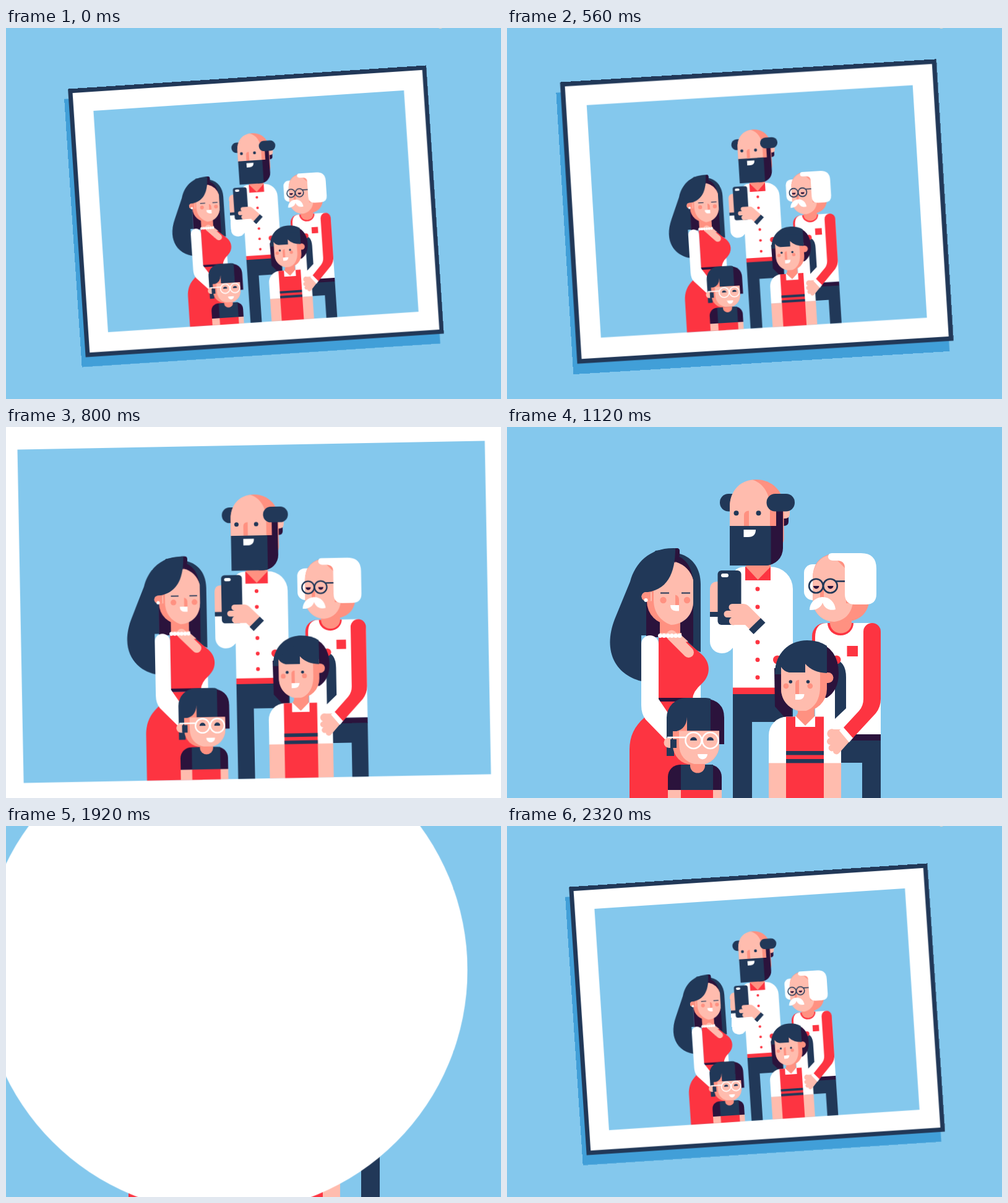
These frames come from a looping animation (800 by 600 pixels, 3600 ms). An HTML page:

```html
<!DOCTYPE html>
<html lang="en">
<head>
<meta charset="utf-8">
<title>Family photo</title>
<style>
  html, body { margin: 0; width: 100%; height: 100%; overflow: hidden; background: #84c8ed; }
  svg { display: block; width: 800px; height: 600px; }
  .sky { fill: #84c8ed; }
  .shade { fill: #419fd8; }
  .navy { fill: #213858; }
  .plum { fill: #2b133c; }
  .red { fill: #fd3441; }
  .skin { fill: #ffbcae; }
  .blush { fill: #ff9181; }
  .white { fill: #fff; }
  .line { fill: none; stroke-width: 2.6; }
  .ink { stroke: #213858; }
  .chalk { stroke: #fff; }

  .card { animation: zoom 3.6s infinite; }
  .flash { transform-origin: 353px 233px; animation: flash 3.6s infinite; }

  @keyframes zoom {
    0%, 10% {
      transform: translate(404px, 296.4px) rotate(-3.77deg) scale(.5875);
      animation-timing-function: cubic-bezier(.7, 0, .315, 1);
    }
    31.111% {
      transform: translate(400px, 300px) rotate(0deg) scale(1);
      animation-timing-function: step-end;
    }
    54.444%, 100% {
      transform: translate(404px, 296.4px) rotate(-3.77deg) scale(.5875);
    }
  }
  @keyframes flash {
    0%, 48.35% {
      transform: scale(0);
      opacity: 1;
      animation-timing-function: cubic-bezier(.6, 0, .8, .4);
    }
    54.444% {
      transform: scale(1);
      opacity: 1;
      animation-timing-function: ease-in-out;
    }
    64.444%, 100% { transform: scale(1); opacity: 0; }
  }
</style>
</head>
<body>
<svg viewBox="0 0 800 600">
  <defs>
    <clipPath id="window"><rect x="-28" y="-5.5" width="856" height="611"/></clipPath>
  </defs>
  <rect class="sky" width="800" height="600"/>
  <ellipse cx="702" cy="-.5" rx="3" ry="1.5" fill="#e3d6c8"/>

  <g class="card">
    <rect class="shade" x="-506" y="-343" width="988" height="740"/>
    <rect class="navy" x="-494" y="-370" width="988" height="740"/>
    <rect class="white" x="-482" y="-358" width="964" height="716"/>
    <g transform="translate(-400 -300)" clip-path="url(#window)">
      <rect class="sky" x="-30" y="-10" width="860" height="620"/>

      <!-- father -->
      <g>
        <path class="navy" d="M365 431H462V477H396V612H365Z"/>
        <path class="skin" d="M328 300V263Q328 250 341 250H345V300Z"/>
        <path class="navy" d="M328 299H345V307.500H328Z"/>
        <path class="white" d="M328 307H365V240Q368 226 385 226H426A36 36 0 0 1 462 262V422H365V357Q358 366 347 366A19 19 0 0 1 328 347Z"/>
        <path class="red" d="M365 421.500H462V432H365ZM385 226H426V248H385Z"/>
        <path class="blush" d="M386 220H426V226L405.500 247L386 226Z"/>
        <g class="red">
          <circle cx="405" cy="262" r="3.500"/>
          <circle cx="405" cy="291" r="3.500"/>
          <circle cx="405" cy="348" r="3.500"/>
          <circle cx="405" cy="376.500" r="3.500"/>
          <circle cx="405" cy="405" r="3.500"/>
        </g>
        <rect class="navy" x="344" y="108" width="40" height="28.500" rx="14"/>
        <path class="plum" d="M444 145H455V153Q455 160 447 160H444Z"/>
        <path class="skin" d="M444 134H457V140Q457 148 449 148H444Z"/>
        <path class="blush" d="M360 165V129C360 104 378 85 403 85C428 85 447.500 104 447.500 129V180Q447.500 188 443 192H400Z"/>
        <path class="skin" d="M360 162V129C360 104 376 87 397 85.500C414 91 425 108 425 130V162Z"/>
        <path class="plum" d="M435 130H446V196A28 28 0 0 1 418 224H410V160H435Z"/>
        <path class="navy" d="M360 160H426.500V222.500Q422 224 417 224H360Z"/>
        <rect class="navy" x="419.500" y="108" width="45.500" height="28.500" rx="14"/>
        <circle class="navy" cx="370.500" cy="139.300" r="4"/>
        <circle class="navy" cx="406.500" cy="139.300" r="4"/>
        <path class="blush" d="M383 160V143Q383 135.500 391 135.500V160Z"/>
        <path class="white" d="M382.500 166H402Q402 178 390 178H382.500Z"/>
        <rect class="navy" x="340.500" y="232" width="38" height="88" rx="6"/>
        <rect class="white" x="346" y="237" width="12" height="6" rx="3"/>
        <path class="skin" d="M364 286H381Q387 286 391 290L411 310L393 328L385 320H368A6 6 0 0 1 363 308H356A5.500 5.500 0 0 1 356 297H364A5.500 5.500 0 0 1 364 286Z"/>
        <path class="navy" d="M410 309L417.500 316.500L398.500 335L391 327.500Z"/>
      </g>

      <!-- mother -->
      <g>
        <path class="navy" d="M268 200H279V205C301 211 313 230 313 254V364L268 345Z"/>
        <path class="plum" d="M225 262L268 208H274C292 214 301 232 301 256V354L285 340H225Z"/>
        <path class="navy" d="M279 205V200Q279 196 274 196H268C230 196 207 220 199 250L176 306C153 360 174 400 217 411V337H225V270L272 214Z"/>
        <path class="blush" d="M247 305H280V340H247Z"/>
        <path class="white" d="M290 395H313V440H290Z"/>
        <path class="skin" d="M247 333H282V345H247Z"/>
        <path class="blush" d="M226 266L258 220H272Q295 225 301 248V282A37.500 38 0 0 1 226 282Z"/>
        <path class="skin" d="M237 262L262 218H272Q295 225 301 248V282C301 304 286 319 265 320C248 314 237 300 237 280Z"/>
        <path class="plum" d="M268 196H274Q279 196 279 201V208L271 220Z"/>
        <path class="navy" d="M272 196C272 236 260 266 219 268L205 240L240 200Z"/>
        <path class="skin" d="M234 267H224A7.300 7.300 0 0 0 224 281.500H234Z"/>
        <path class="blush" d="M232 267H224A7.300 7.300 0 0 0 224 281.500H232Z"/>
        <circle class="white" cx="224.500" cy="280" r="3"/>
        <path class="line ink" style="stroke-width:2" d="M248 268.500H262M282 268.500H296"/>
        <circle class="blush" cx="252.500" cy="280" r="5.200"/>
        <circle class="blush" cx="291" cy="280" r="5.200"/>
        <path class="blush" d="M272 288V271.500Q278 273 278 279V288Z"/>
        <path class="white" d="M264 288H278V297.500H273Q264 297 264 288Z"/>
        <path class="red" d="M245 340H283L315 368C329 381 330 401 315 415Q300 428 300 440H245Z"/>
        <path d="M266 337L293.500 364.500" fill="none" stroke="#ffbcae" stroke-width="17" stroke-linecap="round"/>
        <path class="skin" d="M255 338H283L293 347L276 350Z"/>
        <g class="white">
          <circle cx="247.500" cy="337.500" r="3.500"/>
          <circle cx="253.800" cy="337.500" r="3.500"/>
          <circle cx="260.100" cy="337.500" r="3.500"/>
          <circle cx="266.400" cy="337.500" r="3.500"/>
          <circle cx="272.700" cy="337.500" r="3.500"/>
          <circle cx="279" cy="337.500" r="3.500"/>
        </g>
        <path class="plum" d="M245 438H300V444H245Z"/>
        <path class="red" d="M245 444H300V612H198V522C198 500 206 484 222 470Z"/>
        <path class="white" d="M217 351A14 14 0 0 1 245 351V440L272 480L258 508L224 473Q217 464 217 450Z"/>
      </g>

      <!-- grandfather -->
      <g>
        <path class="red" d="M493 360V338A21 21 0 0 1 514 317H540V360Z"/>
        <path class="white" d="M498 497V340C498 326 504 317 516 317H590Q604 322 604 340V497Z"/>
        <path class="plum" d="M520 497H604V508H520Z"/>
        <path class="navy" d="M520 507H604V612H574V543H520Z"/>
        <path class="red" d="M518 317H560A21 20 0 0 1 518 317Z"/>
        <path class="blush" d="M522 300H557V317A17.500 16.500 0 0 1 522 317Z"/>
        <rect class="white" x="480" y="222" width="36" height="58" rx="14"/>
        <path class="blush" d="M494 245Q494 212 524 205H560V284H585C582 304 566 315 545 315H530C510 315 494 300 494 280Z"/>
        <path class="skin" d="M494 245Q495 212 524 206L548 230V285H559C556 302 546 313 529 315C510 315 494 300 494 280Z"/>
        <path class="white" d="M525 204H572Q597 204 597 229V270Q597 287 580 287H562Q546 287 546 270V228Q546 216 533 216H526Q519 215 519 210Q519 204 525 204Z"/>
        <path class="blush" d="M506 278V265Q506 261 512 261V278Z"/>
        <path class="plum" d="M495 257H504.500A4.700 4.700 0 0 1 495 257ZM518 257H527.500A4.700 4.700 0 0 1 518 257Z"/>
        <circle class="line ink" cx="499.500" cy="257" r="11.300"/>
        <circle class="line ink" cx="522.500" cy="257" r="11.300"/>
        <path class="line ink" d="M531 249.500H546"/>
        <path class="white" d="M509 275C497 276 489 285 489 296C500 297 508 291 510 284C513 293 521 298 531 295C530 284 522 274.500 509 275Z"/>
        <rect class="red" x="549.500" y="354" width="17.500" height="17"/>
      </g>

      <!-- daughter -->
      <g>
        <path class="plum" d="M432 390H460V470H449L433 452Z"/>
        <path class="navy" d="M528 376Q548 378 548 405V455L530 472V400Z"/>
        <circle class="red" cx="437" cy="376.500" r="7"/>
        <circle class="red" cx="532.500" cy="376.500" r="7"/>
        <path class="plum" d="M500 347Q536 358 536 398C536 418 529 430 517 438H500Z"/>
        <path class="navy" d="M433 400V398C433 366 456 345 485 345Q504 345 517 354V400Z"/>
        <path class="blush" d="M470 450H497V485H470Z"/>
        <path class="blush" d="M510 397H519A8.500 8.500 0 0 1 519 414H510Z"/>
        <path class="blush" d="M443 389H517V424A37 36 0 0 1 443 424Z"/>
        <path class="skin" d="M443 386L482 380L506 395V420C506 442 496 456 480 460C459 460 443 444 443 424Z"/>
        <path class="navy" d="M440 384L470 365H517V398Q494 397 482 383V397H456Q447 395 443 388Z"/>
        <circle class="navy" cx="458.300" cy="412" r="2.800"/>
        <circle class="navy" cx="486.500" cy="412" r="2.800"/>
        <circle class="blush" cx="451" cy="418.800" r="4.400"/>
        <circle class="blush" cx="489.800" cy="418.800" r="4.400"/>
        <path class="blush" d="M466 432V415Q466 409 472 409V432Z"/>
        <path class="white" d="M466 432H480.500Q480 441 471 441H466Z"/>
        <path class="white" d="M423 544V499A30 30 0 0 1 453 468.500H512Q540 470 540 499V544Z"/>
        <path class="skin" d="M423 543.500H540V612H423Z"/>
        <path class="red" d="M451 468.500H512V612H451Z"/>
        <path class="white" d="M466 468H498V485H466Z"/>
        <path class="blush" d="M467 468L472 459H492L497 468L482 483Z"/>
        <path class="navy" d="M451 524H512V530.500H451ZM451 537H512V543.500H451Z"/>
      </g>

      <!-- grandfather's arm around her -->
      <g>
        <path class="skin" d="M528 489H540L554 508L537 527A5.500 5.500 0 0 1 527 524A5 5 0 0 1 523 514A5.500 5.500 0 0 1 522 503A7 7 0 0 1 528 489Z"/>
        <path class="white" d="M545 484L560 502L553 510L537 491Z"/>
        <path class="red" d="M576 331A14 14 0 0 1 604 331V440Q604 453 596 463L559 503L544 486L569 459Q576 451 576 440Z"/>
      </g>

      <!-- son -->
      <g>
        <path class="plum" d="M320 439Q351 442 351 470V513H320Z"/>
        <path class="navy" d="M258 532V470A32 32 0 0 1 290 438H321Q326 438 329 439.500V500H270V532Z"/>
        <path class="blush" d="M268 492H274Q290 488 291 469V491.500H343V515A31 31 0 0 1 312 546H299A31 31 0 0 1 268 515Z"/>
        <path class="skin" d="M278 491.500H343V515A31 31 0 0 1 312 546H306Q278 540 278 512Z"/>
        <path class="skin" d="M266 502H262A8.500 8.500 0 0 0 262 519H266Z"/>
        <path class="navy" d="M264 505H274V519H264Z"/>
        <path class="navy" d="M296 507A5.500 5.500 0 0 1 307 507ZM323 507A5.500 5.500 0 0 1 334 507Z"/>
        <circle class="line chalk" cx="301.500" cy="507" r="13"/>
        <circle class="line chalk" cx="328.500" cy="507" r="13"/>
        <path class="line chalk" d="M259 502H289"/>
        <path class="white" d="M308 529H324A8 8.500 0 0 1 308 529Z"/>
        <path class="skin" d="M260 586H347V612H260Z"/>
        <path class="plum" d="M260 587V566A20 20 0 0 1 280 546H327A20 20 0 0 1 347 566V587Z"/>
        <path class="navy" d="M281 546H333V587H281Z"/>
        <path class="red" d="M281 587H333V612H281Z"/>
        <path class="blush" d="M296 545H320V548A12 11.500 0 0 1 296 548Z"/>
      </g>
    </g>
  </g>
  <circle class="flash white" cx="353" cy="233" r="720"/>
</svg>
</body>
</html>
```
